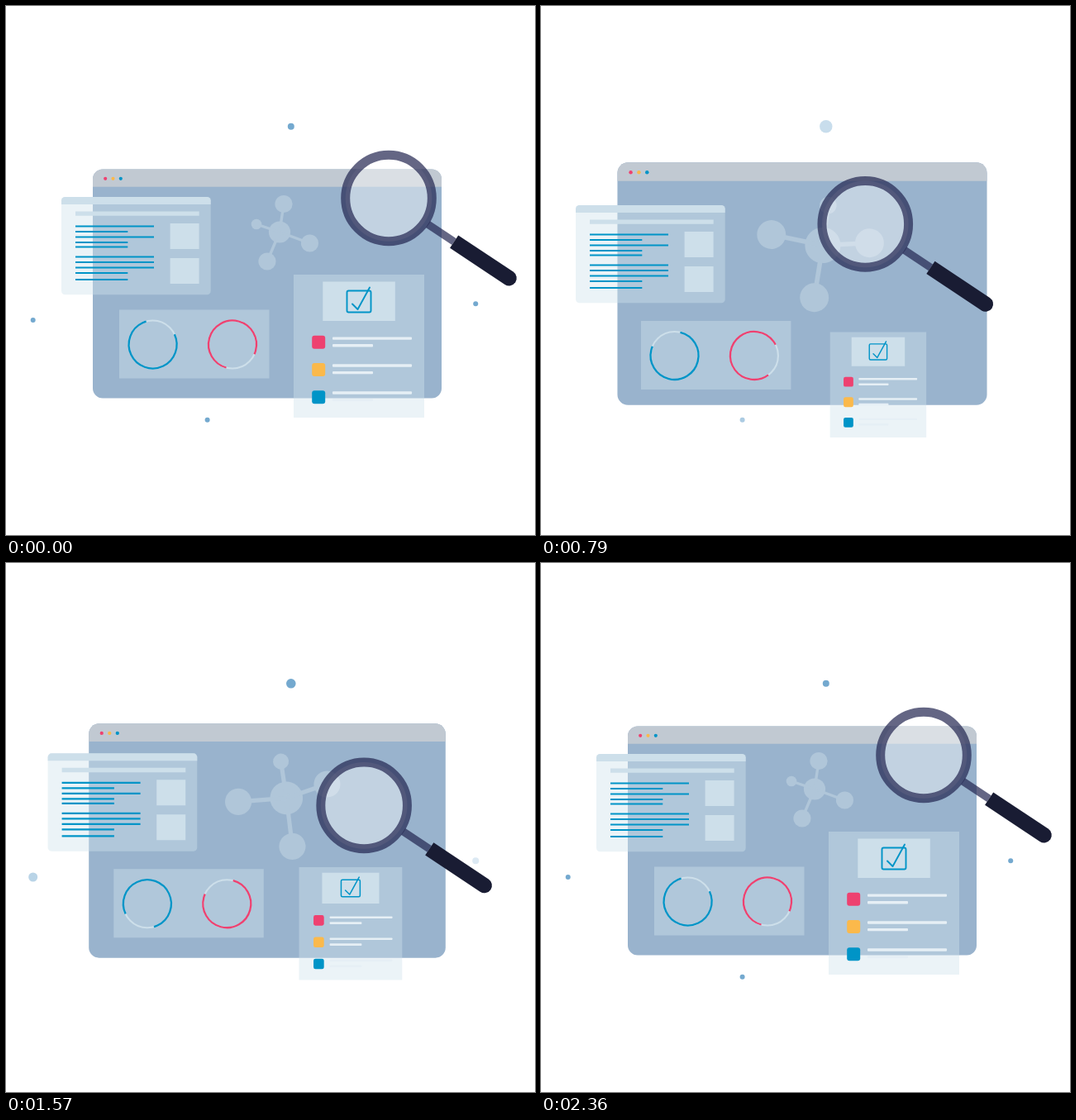
Animation of 640x640 px, one loop 2430 ms. Source, as an HTML page with a canvas:

```html
<!DOCTYPE html>
<html lang="en">
<head>
<meta charset="utf-8">
<title>Data search</title>
<style>
  html, body { margin: 0; width: 100%; height: 100%; overflow: hidden; background: #fff; }
  canvas { display: block; width: 100vw; height: 100vh; }
</style>
</head>
<body>
<canvas id="stage" width="640" height="640"></canvas>
<script>
const ctx = document.getElementById('stage').getContext('2d');

const LOOP = 2430, FPS = 14, LAST = 33;
const TIMES = [0, 4, 8, 15, 19, 25];

const BLUE = '#0094c7', PINK = '#ee4170', YELLOW = '#fbb94b';
const PALE = '#cddfea', MIST = '#b0c6d9', LINE = '#e6eff5';
const GLASS = 'rgba(207,226,236,.42)', NAVY = 'rgba(35,38,80,.7)';

// Monotone cubic through the values at TIMES plus extra keys; returns to the first value.
function curve(values, extra = {}) {
  const keys = { [LAST]: values[0], ...extra };
  values.forEach((v, i) => keys[TIMES[i]] = v);
  const t = Object.keys(keys).map(Number), v = Object.values(keys);
  const rate = i => (v[i + 1] - v[i]) / (t[i + 1] - t[i]);
  const slope = v.map((_, i) => {
    if (i === 0 || i === v.length - 1) return 0;
    const a = rate(i - 1), b = rate(i);
    return a * b <= 0 ? 0 : 2 * a * b / (a + b);
  });
  return k => {
    if (k >= LAST) return v[v.length - 1];
    const i = t.findIndex(x => x > k) - 1;
    const h = t[i + 1] - t[i], u = (k - t[i]) / h, w = 1 - u;
    return v[i] * (1 + 2 * u) * w * w + v[i + 1] * (3 - 2 * u) * u * u
         + h * u * w * (slope[i] * w - slope[i + 1] * u);
  };
}

const browser = { scale: curve([1, 1.04, 1.0616, 1.047, 1.033, 1.014], { 9: 1.062 }) };
const article = {
  x: curve([67, 58.5, 47, 44, 46.2, 56], { 12: 41.5 }),
  y: curve([231, 238.3, 244.5, 234.4, 233, 228.4])
};
const charts = {
  x: curve([137, 125.5, 120.5, 122.4, 126.4, 133.5]),
  y: curve([367.5, 373, 383, 376, 372.3, 368.8]),
  spin: curve([0, -82, -242, -638, -784, -989], { 33: -1080 })
};
const molecule = {
  x: curve([331, 330, 339, 342, 341, 337]),
  y: curve([273.5, 281, 288.5, 290, 289, 279]),
  turn: curve([0, 44, 75, 81, 78, 41])
};
const list = {
  x: curve([427, 416.3, 407.3, 409.8, 413, 420.8]),
  y: curve([498, 504.5, 521, 515, 508, 502], { 10: 522.5 }),
  scale: curve([1, 0.788, 0.737, 0.737, 0.737, 0.871])
};
const lens = {
  x: curve([463, 427.5, 390.5, 397.5, 405.5, 466], { 28: 481.5, 32: 463 }),
  y: curve([232.5, 225.2, 241.3, 290.7, 297, 285], { 32: 232.5 })
};
const sparks = [
  { x: 344.8, y: 145.8, r: curve([4, 4, 8, 7, 6.4, 5.2]), alpha: curve([1, 0.5, 0, 1, 1, 1]) },
  { x: 32.7, y: 380, r: curve([3, 5.7, 5.7, 5.7, 5.7, 5.1]), alpha: curve([1, 1, 0, 0, 0, 1]) },
  { x: 243.6, y: 500.8, r: curve([3, 4.7, 3, 3, 5, 5]), alpha: curve([1, 1, 1, 0, 0, 0], { 29: 1 }) },
  { x: 568.2, y: 360.2, r: curve([3, 3, 3.5, 4, 4, 4]), alpha: curve([1, 0, 0, 0, 0.5, 0], { 16: 0, 29: 1 }) }
];

function box(x, y, w, h, color, radius = 0) {
  ctx.fillStyle = color;
  ctx.beginPath();
  ctx.roundRect(x, y, w, h, radius);
  ctx.fill();
}

function disc(x, y, r, color) {
  ctx.fillStyle = color;
  ctx.beginPath();
  ctx.arc(x, y, r, 0, 2 * Math.PI);
  ctx.fill();
}

function path(points, width, color) {
  ctx.strokeStyle = color;
  ctx.lineWidth = width;
  ctx.beginPath();
  points.forEach(p => ctx.lineTo(...p));
  ctx.stroke();
}

function arc(x, y, r, from, to, width, color) {
  ctx.strokeStyle = color;
  ctx.lineWidth = width;
  ctx.beginPath();
  ctx.arc(x, y, r, from * Math.PI / 180, to * Math.PI / 180);
  ctx.stroke();
}

function place(x, y, scale, angle, draw) {
  ctx.save();
  ctx.translate(x, y);
  ctx.rotate(angle * Math.PI / 180);
  ctx.scale(scale, scale);
  draw();
  ctx.restore();
}

function drawBrowser() {
  box(-211, -138.5, 422, 277, '#99b3cd', 12);
  box(-211, -138.5, 422, 21.2, '#c1c9d2', [12, 12, 0, 0]);
  [PINK, YELLOW, BLUE].forEach((c, i) => disc(-195.8 + i * 9.3, -127.2, 2.1, c));
}

function drawArticle() {
  box(0, 0, 180.7, 118.3, GLASS, 4.5);
  box(0, 0, 180.7, 9, PALE, [4.5, 4.5, 0, 0]);
  box(17, 17.5, 149.7, 5.3, PALE);
  box(131.6, 32, 35, 31, PALE);
  box(131.6, 74, 35, 31, PALE);
  for (const y of [35.5, 48.5, 72.5, 79, 85.5]) path([[17, y], [112, y]], 2.1, BLUE);
  for (const y of [42, 55, 60.5, 92, 100]) path([[17, y], [80.3, y]], 2.1, BLUE);
}

function drawCharts(spin) {
  const ring = (x, start, color) => {
    arc(x, 42, 29, 0, 360, 2.1, PALE);
    arc(x, 42, 29, start + spin, start + spin + 279, 2.3, color);
  };
  box(0, 0, 181.5, 83, GLASS);
  ring(40.6, -25, BLUE);
  ring(137, 105, PINK);
}

function drawMolecule() {
  const atoms = [[-28, -9.5, 6.3], [5, -34, 10.6], [36.5, 13.5, 10.6], [-15, 35.5, 10.6]];
  disc(0, 0, 13.1, MIST);
  for (const [x, y, r] of atoms) {
    path([[0, 0], [x, y]], 3.4, MIST);
    disc(x, y, r, MIST);
  }
}

function drawList() {
  ctx.translate(-79, -173);
  box(0, 0, 158, 173, GLASS);
  box(35.3, 8.6, 87.5, 47.4, PALE);
  ctx.strokeStyle = BLUE;
  ctx.lineWidth = 1.9;
  ctx.beginPath();
  ctx.roundRect(64.5, 19.5, 29, 26, 2);
  ctx.stroke();
  ctx.lineCap = ctx.lineJoin = 'round';
  path([[71, 35.5], [77.5, 42], [92, 15.5]], 1.9, BLUE);
  [PINK, YELLOW, BLUE].forEach((color, i) => {
    const y = i * 33.3;
    box(22.2, 73.7 + y, 16, 16, color, 3);
    box(47, 75.4 + y * 0.99, 96, 3.3, LINE, 1);
    box(47, 84.1 + y * 0.99, 49, 3.3, LINE, 1);
  });
}

function drawLens() {
  disc(0, 0, 52.3, 'rgba(255,255,255,.4)');
  arc(0, 0, 52.3, 0, 360, 11, NAVY);
  ctx.rotate(33.6 * Math.PI / 180);
  box(57, -4.7, 38, 9.4, NAVY);
  box(95, -9.2, 89, 18.4, '#191c33', [0, 9.2, 9.2, 0]);
}

function draw(k) {
  ctx.clearRect(0, 0, 640, 640);
  for (const s of sparks) {
    ctx.globalAlpha = s.alpha(k);
    disc(s.x, s.y, s.r(k), '#74a9cf');
  }
  ctx.globalAlpha = 1;
  const turn = molecule.turn(k);
  place(316, 336, browser.scale(k), 0, drawBrowser);
  place(article.x(k), article.y(k), 1, 0, drawArticle);
  place(charts.x(k), charts.y(k), 1, 0, () => drawCharts(charts.spin(k)));
  place(molecule.x(k), molecule.y(k), 1 + turn * 0.0082, turn, drawMolecule);
  place(list.x(k), list.y(k), list.scale(k), 0, drawList);
  place(lens.x(k), lens.y(k), 1, 0, drawLens);
}

// The picture advances in steps of 1/14 s, on a 10 ms clock.
function tick() {
  const tens = Math.floor(performance.now() % LOOP / 10);
  draw(Math.floor((tens + 0.5) * FPS / 100));
  requestAnimationFrame(tick);
}
tick();
</script>
</body>
</html>
```
